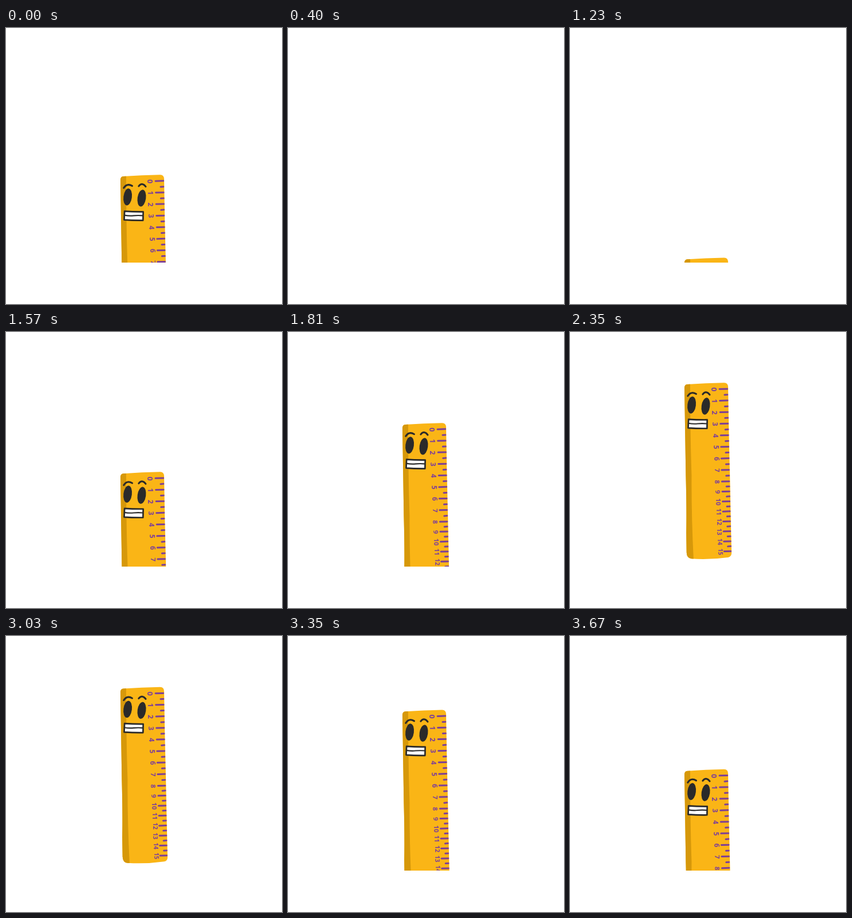
These frames come from a looping animation (480 by 480 pixels, 3.73 s). An HTML page:

```html
<!DOCTYPE html>
<html lang="en">
<head>
<meta charset="utf-8">
<title>Nervous ruler</title>
<style>
  html, body { margin: 0; width: 100%; height: 100%; overflow: hidden; background: #fff; }
  svg { display: block; width: 100vw; height: 100vh; }
  .ink { fill: none; stroke: #2a2a2a; stroke-linecap: round; stroke-linejoin: round; }
  #scale { stroke: #7d3f98; stroke-width: 3; stroke-linecap: round; }
  #scale text {
    fill: #7d3f98; stroke: none; text-anchor: middle;
    font-family: "Open Sans", sans-serif; font-weight: 700;
  }
</style>
</head>
<body>
<svg viewBox="0 0 480 480">
  <defs>
    <clipPath id="desk"><rect width="480" height="408"/></clipPath>
    <clipPath id="edge"><use href="#body"/></clipPath>
  </defs>
  <g clip-path="url(#desk)">
    <g id="ruler">
      <path id="body" fill="#fab516" d="M199 98Q199 92.200 204 91.800Q236 89.800 268 89Q275 89 275 97Q276 170 278 245Q279.500 320 281 385Q281 391.300 275 392.600Q244 397 211 395Q203 394 202.700 384L202.200 350Q203 310 201.400 250Z"/>
      <path fill="#d6980a" clip-path="url(#edge)" d="M195 85H209Q209 180 211.500 250Q211 320 215 398H195Z"/>
      <g id="scale"></g>
      <path class="ink" stroke-width="3" d="M204.800 112Q210.500 103 219.500 108.500M230.800 109Q236.500 101.500 243 109.800"/>
      <g fill="#2a2a2a">
        <ellipse rx="7.300" ry="14.800" transform="translate(211.600 127.700) rotate(7)"/>
        <ellipse rx="7.300" ry="14.800" transform="translate(236 129.700) rotate(8)"/>
      </g>
      <path class="ink" style="fill:#fff" stroke-width="2.700" d="M206.200 152.500Q222 153.600 238.600 153.400L238.300 168.400Q221 168.600 205.500 167.500Z"/>
      <path class="ink" stroke-width="2.100" d="M206 159.500Q214 161 222 160.200T238 160.200"/>
    </g>
  </g>
</svg>
<script>
const LOOP = 3730;
const ruler = document.getElementById('ruler');

// The scale drifts right with the edge and tightens after 8
const markY = n => 100 + 20.1 * Math.min(n, 8) + 17.35 * Math.max(n - 8, 0);
const edgeX = n => 273.500 + 0.4 * n;

function tick(n, length) {
  const y = markY(n), x = edgeX(n);
  return `<path d="M${x - length} ${y}L${x} ${y - 0.3}"/>`;
}

function label(n) {
  const x = 250.300 + 0.76 * n;
  return `<text transform="translate(${x} ${markY(n) + 0.6}) rotate(90)"
    dy=".36em" font-size="${12.500 - n / 6}">${n}</text>`;
}

let marks = '';
for (let n = 0; n <= 15; n++) {
  marks += label(n) + tick(n, 13.500 - n / 7);
  if (n < 15) marks += tick(n + 0.5, 4.800);
}
document.getElementById('scale').innerHTML = marks;

// Distance after a steady speed-up over `ramp` ms to a constant speed
function glide(time, speed, ramp) {
  const t = Math.max(time, 0);
  return t < ramp ? speed * t * t / (2 * ramp) : speed * (t - ramp / 2);
}

// The ruler slows to a stop at 2300 ms and starts to sink at 2995 ms
function drop(t) {
  if (t <= 400) t += LOOP;
  return (t < 2600 ? glide(2300 - t, 0.4626, 795) : glide(t - 2995, 0.388, 610)) - 0.7;
}

// [start, length of one held pose]
const cadence = [[0, 60], [60, 42.5], [1230, 42.5], [1570, 60], [1870, 80], [3030, 80], [3430, 60]];

function held(t) {
  const [start, hold] = cadence.findLast(([from]) => from <= t);
  return start + Math.floor((t - start) / hold) * hold;
}

function draw() {
  const t = performance.now() % LOOP;
  ruler.setAttribute('transform', `translate(0 ${drop(held(t))})`);
  requestAnimationFrame(draw);
}
draw();
</script>
</body>
</html>
```
